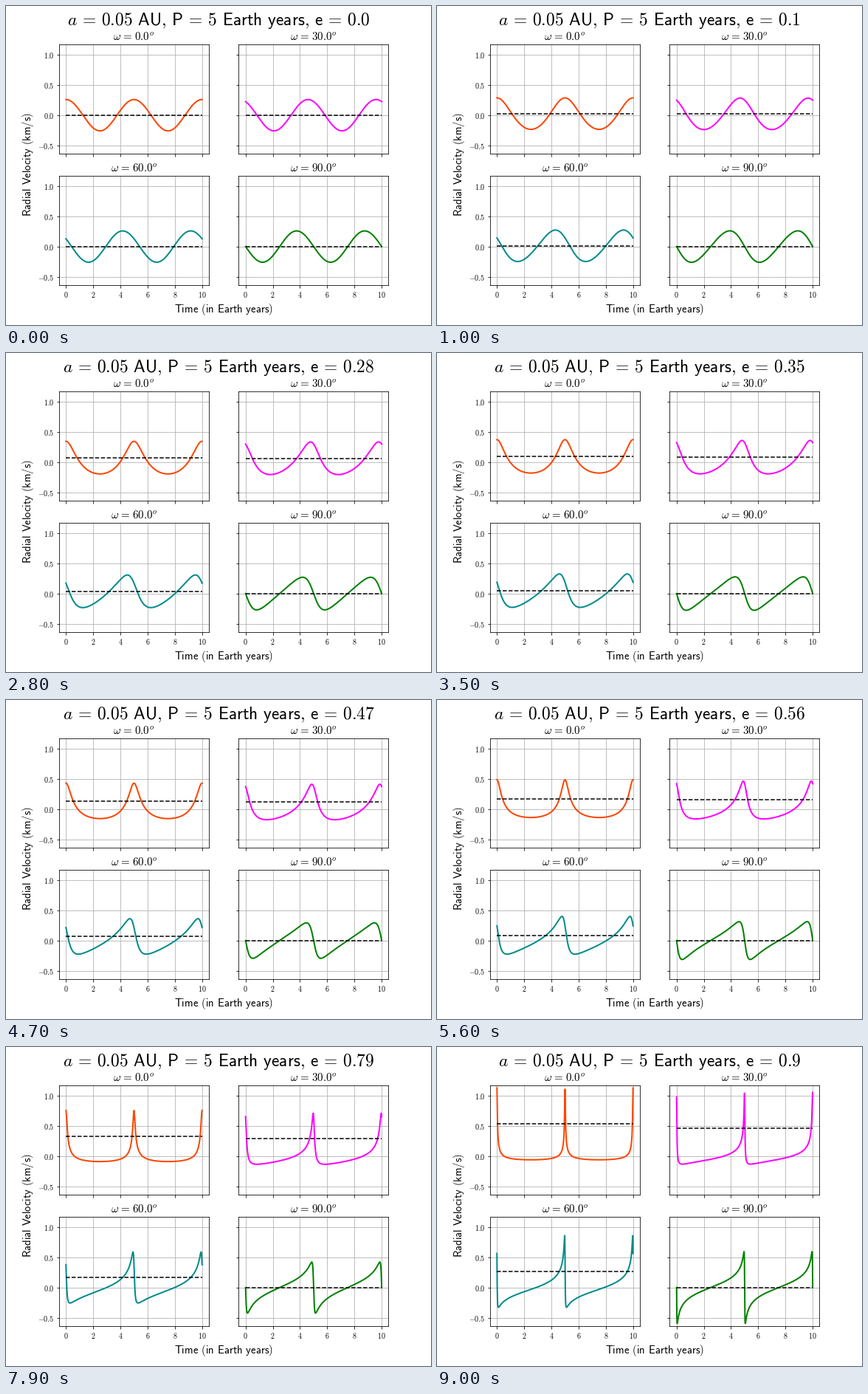
These frames come from a looping animation (576 by 432 pixels, 9.1 s). A matplotlib script:

```python
import numpy as np
import matplotlib.pyplot as plt
from matplotlib.animation import FuncAnimation

plt.rcParams.update({"mathtext.fontset": "cm", "font.size": 10})

W, H, DPI = 576, 432, 72
AXIS_AU, PERIOD, INCL = 0.05, 5, 60
AU_KM, YEAR_S = 1.496e8, 3.156e7
K0 = 2 * np.pi * AXIS_AU * AU_KM / (PERIOD * YEAR_S) * np.sin(np.radians(INCL))
PANELS = [(0, "orangered"), (30, "magenta"), (60, "darkcyan"), (90, "green")]

t = np.linspace(0, 10, 1000)
mean_anomaly = 2 * np.pi * (t / PERIOD % 1)


def sans(s):
    """Upright sans text set with word spaces of a third of an em."""
    s = s.replace(",", "{,}")
    s = s.replace(" = ", r"\hspace{0.18}=\hspace{0.18}")
    return r"\mathsf{%s}" % s.replace(" ", r"\hspace{0.38}")


def true_anomaly(e):
    E = np.full_like(t, np.pi)
    for _ in range(30):
        E -= (E - e * np.sin(E) - mean_anomaly) / (1 - e * np.cos(E))
    return 2 * np.arctan2(np.sqrt(1 + e) * np.sin(E / 2),
                          np.sqrt(1 - e) * np.cos(E / 2))


def heading(e):
    rest = sans(f" = {AXIS_AU} AU, P = {PERIOD} Earth years, e = {e}")
    return f"$a{rest}$"


def label(x, y, s, **kw):
    return fig.text(x / W, 1 - y / H, s, ha="center", va="baseline", **kw)


fig, axes = plt.subplots(2, 2, sharex=True, sharey=True,
                         figsize=(W / DPI, H / DPI), dpi=DPI)
fig.subplots_adjust(left=0.125, right=0.9, bottom=0.125, top=0.88,
                    wspace=0.2, hspace=0.2)

curves, means = [], []
for ax, (omega, color) in zip(axes.flat, PANELS):
    curves += ax.plot(t, 0 * t, color=color, lw=2)
    means += ax.plot([0, 10], [0, 0], "k--", lw=1.5)
    ax.set_title(r"$\omega\hspace{0.116}=\hspace{0.116}%.1f^o$" % omega,
                 fontsize=15)
    ax.grid(True)

ax = axes[0, 0]
ax.set_xlim(-0.5, 10.5)
ax.set_ylim(-0.635, 1.168)
ax.set_xticks(range(0, 11, 2))
ax.set_yticks([-0.5, 0, 0.5, 1])
ax.xaxis.set_major_formatter(lambda v, _: f"${v:.0f}$")
ax.yaxis.set_major_formatter(lambda v, _: f"${v:.1f}$")

title = label(288, 26, heading(0.0), fontsize=23.45)
label(295.2, 415, f"${sans('Time (in Earth years)')}$", fontsize=14.7)
fig.text(33.5 / W, 1 - 214.9 / H, f"${sans('Radial Velocity (km/s)')}$",
         fontsize=14.7, rotation=90, rotation_mode="anchor",
         ha="center", va="baseline")


def update(i):
    e = i / 100
    theta = true_anomaly(e)
    k = K0 / np.sqrt(1 - e * e)
    for (omega, _), curve, mean in zip(PANELS, curves, means):
        w = np.radians(omega)
        offset = k * e * np.cos(w)
        curve.set_ydata(k * np.cos(theta + w) + offset)
        mean.set_ydata([offset, offset])
    title.set_text(heading(e))
    return [*curves, *means, title]


anim = FuncAnimation(fig, update, frames=91, interval=100, repeat=True,
                     repeat_delay=0)
plt.show()
```
